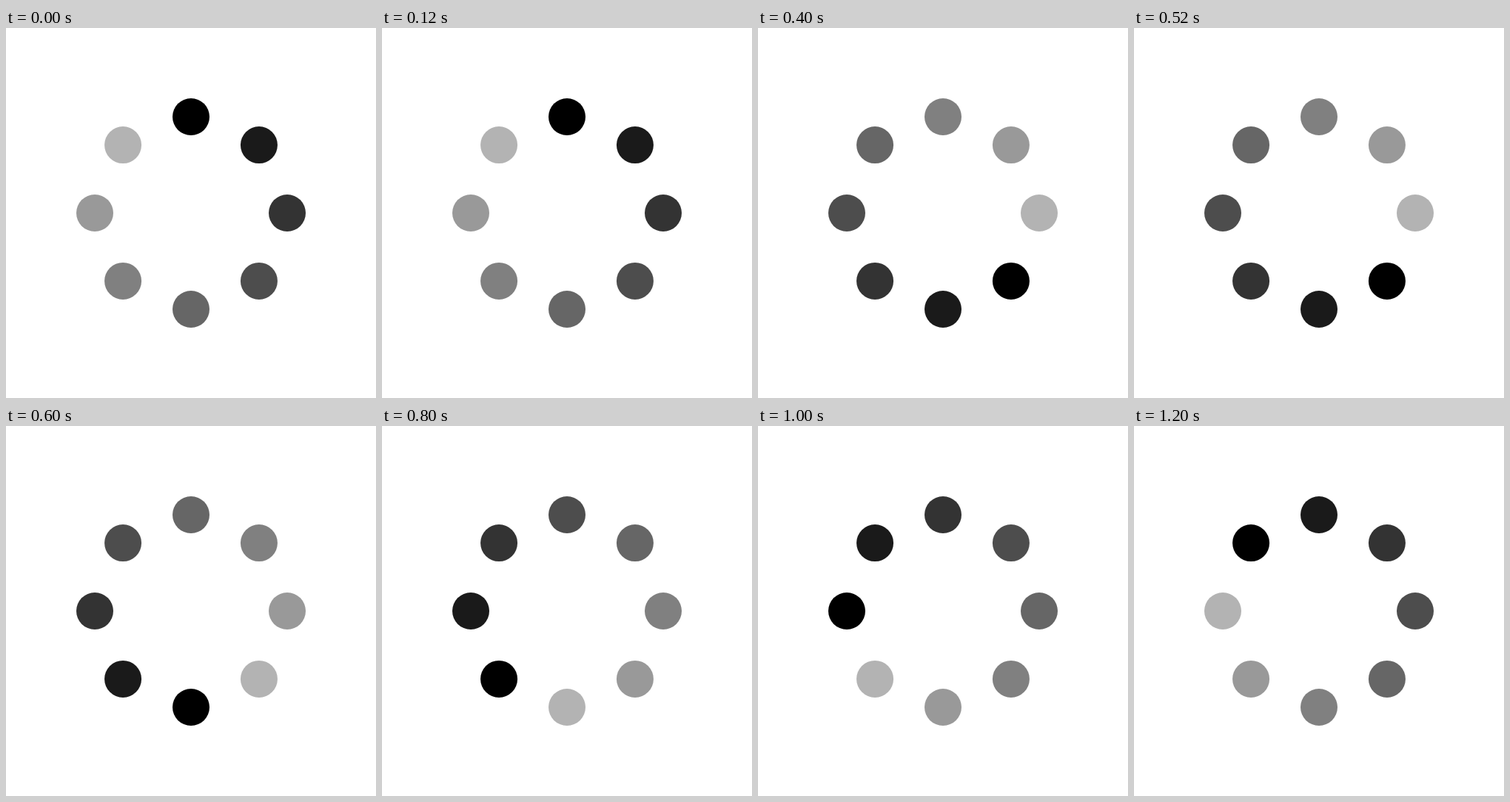
Recreate the animation shown at these times as an HTML page. Size 500 by 500 pixels, loop 1400 ms.

```html
<!DOCTYPE html>
<html lang="en">
<head>
<meta charset="utf-8">
<title>Loading spinner</title>
<style>
  html, body { margin: 0; height: 100%; overflow: hidden; background: #fff; }
  svg { display: block; width: 100%; height: 100%; }
</style>
</head>
<body>
<svg viewBox="0 0 500 500"></svg>
<script>
const COUNT = 8, STEP = 200;
const HEADS = [0, 1, 3, 4, 5, 6, 7]; // the darkest dot skips one place per turn
const svg = document.querySelector('svg');

const dots = Array.from({ length: COUNT }, (_, i) => {
  const angle = i / COUNT * 2 * Math.PI;
  const dot = document.createElementNS('http://www.w3.org/2000/svg', 'circle');
  dot.setAttribute('cx', 250 + 130 * Math.sin(angle));
  dot.setAttribute('cy', 250 - 130 * Math.cos(angle));
  dot.setAttribute('r', 25);
  return svg.appendChild(dot);
});

function draw(time) {
  const head = HEADS[Math.floor(time / STEP) % HEADS.length];
  dots.forEach((dot, i) => {
    const grey = Math.round(25.5 * ((i - head + COUNT) % COUNT));
    dot.setAttribute('fill', `rgb(${grey},${grey},${grey})`);
  });
}

let start;
function tick(now) {
  start ??= now;
  draw(now - start);
  requestAnimationFrame(tick);
}
draw(0);
requestAnimationFrame(tick);
</script>
</body>
</html>
```
